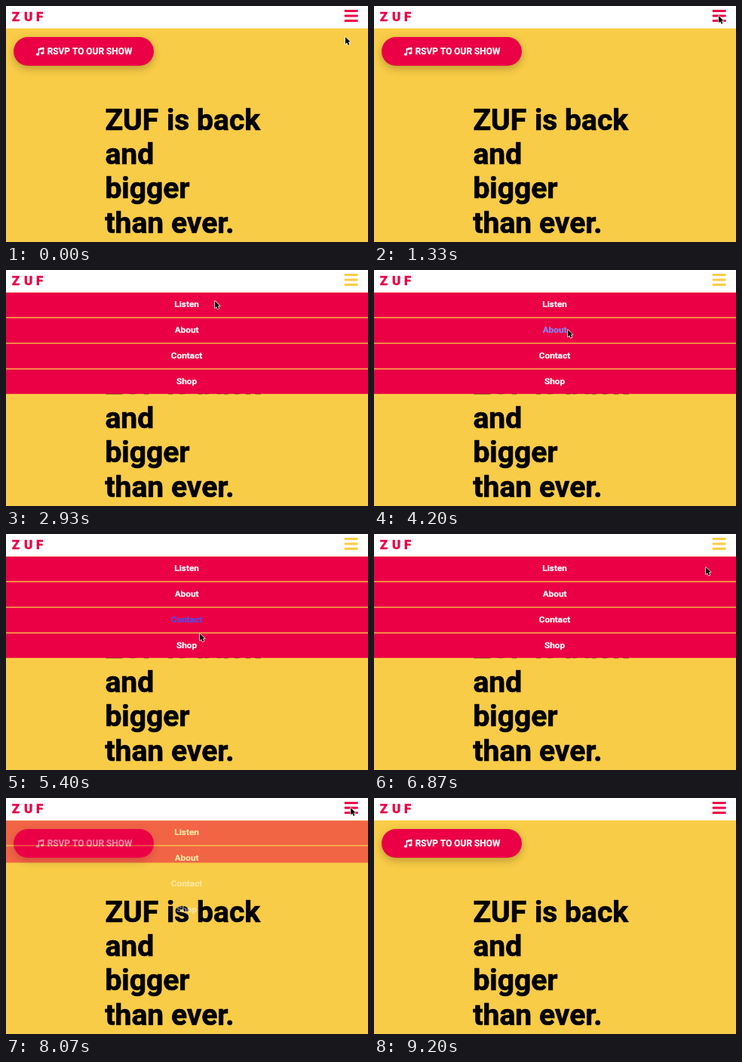
These frames come from a looping animation (480 px wide and 312 px high, 9670 ms). An HTML page with a canvas:

```html
<!DOCTYPE html>
<html lang="en">
<head>
<meta charset="utf-8">
<title>Menu</title>
<style>
  html, body { margin: 0; width: 100%; height: 100%; overflow: hidden; background: #f8cc47; }
  canvas { display: block; width: 480px; height: 312px; }
</style>
</head>
<body>
<canvas id="stage"></canvas>
<script>
const W = 480, H = 312, LOOP = 9670;
const RED = '#eb0045', YELLOW = '#f8cc47', WHITE = '#fff', BLACK = '#000';
const TOP = 29.6, ROW = 33.9, MENU_H = 134.2;
const OPEN_AT = 1616, CLOSE_AT = 7936, SLIDE = 400, FADE = 250;
const CURSOR_GONE = 9130;
const LABELS = ['Listen', 'About', 'Contact', 'Shop'];

const dpr = window.devicePixelRatio || 1;
function setUp(canvas) {
  canvas.width = W * dpr;
  canvas.height = H * dpr;
  const c = canvas.getContext('2d');
  c.scale(dpr, dpr);
  return c;
}
const ctx = setUp(document.getElementById('stage'));
const layer = setUp(document.createElement('canvas'));

const clamp = v => Math.min(1, Math.max(0, v));
const smooth = u => u * u * (3 - 2 * u);
const mix = (a, b, u) => a + (b - a) * u;

// CSS "ease": cubic-bezier(.25, .1, .25, 1)
function ease(x) {
  if (x <= 0 || x >= 1) return clamp(x);
  const curve = (a, b, s) => 3 * a * s * (1 - s) ** 2 + 3 * b * s * s * (1 - s) + s ** 3;
  let lo = 0, hi = 1;
  for (let i = 0; i < 20; i++) {
    const mid = (lo + hi) / 2;
    if (curve(.25, .25, mid) < x) lo = mid; else hi = mid;
  }
  return curve(.1, 1, lo);
}

// eased rise at one time and fall at another
const pulse = (t, on, off, span) =>
  ease(clamp((t - on) / span)) - ease(clamp((t - off) / span));

// pointer moves: start, end and destination
const move = (from, to, x, y) => ({ from, to, x, y });
const overRow = (from, to, row) => move(from, to, 257, 44 + row * 35);
const toButton = (from, to) => move(from, to, 457, 13);
const home = { x: 450, y: 41 };
const visits = [overRow(2400, 3060, 0), overRow(3470, 4200, 1),
                overRow(4470, 4870, 2), overRow(5180, 5620, 3)];
const moves = [toButton(70, 470), ...visits, move(6130, 6870, 440, 44), toButton(7070, 7730)];

// each label lights up as the pointer arrives and fades once it leaves
const hover = (t, row) =>
  pulse(t, visits[row].to - 70, moves[row + 2].from + 170, FADE);

function text(c, str, x, y, size, color, align = 'left', weight = 700) {
  c.font = `${weight} ${size}px Roboto, sans-serif`;
  c.textAlign = align;
  c.fillStyle = c.strokeStyle = color;
  c.lineWidth = size * .018;
  c.lineJoin = 'round';
  c.fillText(str, x, y);
  c.strokeText(str, x, y);
}

function pill(x, y, w, h, r, color) {
  ctx.fillStyle = color;
  ctx.beginPath();
  ctx.roundRect(x, y, w, h, r);
  ctx.fill();
}

function drawNote() {
  ctx.fillStyle = ctx.strokeStyle = WHITE;
  ctx.lineWidth = 1.4;
  const heads = [[42, 64], [48.2, 62.2]];
  for (const [x, y] of heads) {
    ctx.beginPath();
    ctx.ellipse(x, y, 2.1, 1.7, 0, 0, 7);
    ctx.fill();
    ctx.beginPath();
    ctx.moveTo(x + 1.4, y);
    ctx.lineTo(x + 1.4, y - 7);
    ctx.stroke();
  }
  ctx.lineWidth = 2.6;
  ctx.beginPath();
  ctx.moveTo(42.7, 57.6);
  ctx.lineTo(50.3, 55.4);
  ctx.stroke();
}

function drawButton() {
  ctx.save();
  ctx.shadowColor = 'rgba(0,0,0,.24)';
  ctx.shadowBlur = 11 * dpr;
  ctx.shadowOffsetY = 4 * dpr;
  pill(10, 41, 186, 38, 19, RED);
  ctx.restore();
  drawNote();
  text(ctx, 'RSVP TO OUR SHOW', 54.7, 64.2, 11.9, WHITE);
}

function drawHeadline() {
  const size = 39, x = 131.4, y = 164;
  text(ctx, 'is back', 213, y, size, BLACK);
  ['ZUF', 'and', 'bigger', 'than ever.'].forEach((line, i) =>
    text(ctx, line, x, y + 45.2 * i, size, BLACK));
}

function drawHeader(open) {
  ctx.fillStyle = WHITE;
  ctx.fillRect(0, 0, W, TOP);
  [...'ZUF'].forEach((c, i) => text(ctx, c, 7.7 + i * 16.2, 19.6, 17, RED, 'left', 900));
  for (let i = 0; i < 3; i++) pill(448.7, 5.1 + i * 6.4, 18, 3, 1, open ? YELLOW : RED);
}

// the panel fades as one layer; labels stay put while it grows behind them
function drawMenu(t) {
  const shown = pulse(t, OPEN_AT, CLOSE_AT, SLIDE);
  if (shown <= 0) return;
  const bottom = TOP + MENU_H * shown;
  layer.clearRect(0, 0, W, H);
  layer.fillStyle = RED;
  layer.fillRect(0, TOP, W, bottom - TOP);
  LABELS.forEach((label, i) => {
    const line = TOP + ROW * i - 1.2;
    layer.fillStyle = YELLOW;
    if (i && line < bottom) layer.fillRect(0, line, W, 1.3);
    const u = hover(t, i), c = mix(255, 0, u);
    text(layer, label, 239.6, 49.4 + i * ROW, 11.8, `rgb(${c},${c},${mix(255, 238, u)})`, 'center');
  });
  ctx.globalAlpha = Math.min(1, shown * 1.2);
  ctx.drawImage(layer.canvas, 0, 0, W, H);
  ctx.globalAlpha = 1;
}

function cursorAt(t) {
  let { x, y } = home;
  for (const m of moves) {
    const u = smooth(clamp((t - m.from) / (m.to - m.from)));
    x = mix(x, m.x, u);
    y = mix(y, m.y, u);
  }
  return [x, y];
}

function drawCursor(t) {
  if (t >= CURSOR_GONE) return;
  ctx.save();
  ctx.translate(...cursorAt(t));
  ctx.scale(.92, .92);
  ctx.beginPath();
  ctx.moveTo(0, 0);
  for (const [x, y] of [[0, 10], [2.3, 7.9], [4, 11.7], [5.8, 10.9], [4.2, 7.2], [7.2, 7.2]])
    ctx.lineTo(x, y);
  ctx.closePath();
  ctx.lineWidth = 1.5;
  ctx.strokeStyle = WHITE;
  ctx.stroke();
  ctx.fillStyle = BLACK;
  ctx.fill();
  ctx.restore();
}

function draw(t) {
  ctx.fillStyle = YELLOW;
  ctx.fillRect(0, 0, W, H);
  drawButton();
  drawHeadline();
  drawMenu(t);
  drawHeader(t >= OPEN_AT && t < CLOSE_AT);
  drawCursor(t);
}

const start = performance.now();
function tick() {
  draw((performance.now() - start) % LOOP);
  requestAnimationFrame(tick);
}
tick();
</script>
</body>
</html>
```
